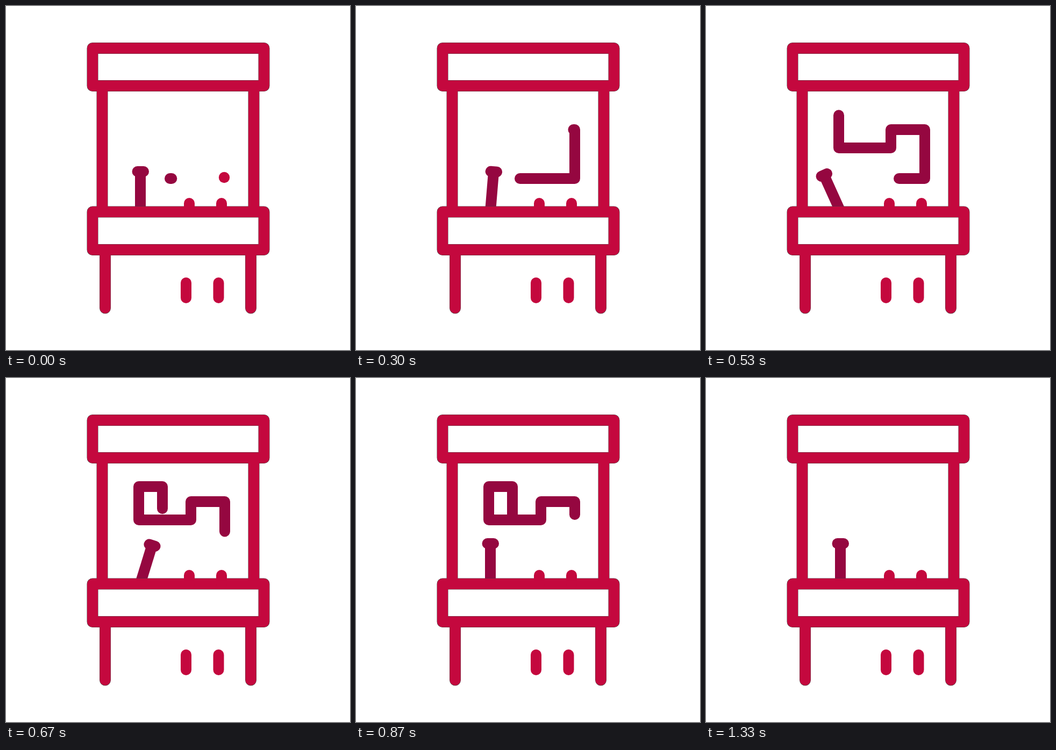
An HTML page that plays this animation: 640x640 px, repeating every 1670 ms.

```html
<!DOCTYPE html>
<html lang="en">
<head>
<meta charset="utf-8">
<title>Arcade machine</title>
<style>
  html, body { margin: 0; width: 100%; height: 100%; overflow: hidden; background: #fff; }
  svg { display: block; width: 100%; height: 100%; }
  .line { fill: none; stroke: #c4083e; stroke-width: 20; stroke-linecap: round; stroke-linejoin: round; }
  .edge { stroke: #444; stroke-width: 21; }
  .dark { stroke: #950740; }
</style>
</head>
<body>
<svg viewBox="0 0 640 640">
  <defs>
    <path id="cabinet" d="M179 148.5V383M461 148.5V383M184.5 453.5V562M455.5 453.5V562
      M161 78.5H480V148.5H161ZM161 383H480V453.5H161Z"/>
  </defs>
  <g id="stick" class="line dark">
    <path d="M250 308V382" stroke-linecap="butt"/>
    <path d="M244.5 308H256"/>
  </g>
  <circle id="food" cx="406" cy="319" r="10.2" fill="#c4083e"/>
  <path id="snake" class="line dark" d="M305 321H407V230H344V264H247V202H291V264"/>
  <use href="#cabinet" class="line edge"/>
  <use href="#cabinet" class="line"/>
  <path class="line" d="M341 367V383M401 367V383M335 515V543M395.5 515V543"/>
</svg>
<script>
const LOOP = 1670, STEP = 33.34;
const [stick, food, snake] = ["stick", "food", "snake"].map(id => document.getElementById(id));

// Cubic bezier easing (.4, 0, .6, 1), solved by bisection
function ease(x) {
  if (x <= 0) return 0;
  if (x >= 1) return 1;
  let lo = 0, hi = 1, s;
  for (let i = 0; i < 24; i++) {
    s = (lo + hi) / 2;
    const r = 1 - s;
    if (1.2 * s * r * r + 1.8 * s * s * r + s ** 3 < x) lo = s; else hi = s;
  }
  return s * s * (3 - 2 * s);
}

const tween = (n, start, end, from, to) => from + (to - from) * ease((n - start) / (end - start));

// Stick angle keys: [step, degrees]
const tilt = [[0, 0], [5, 18], [15.5, -25.2], [20.5, 18], [26, 0]];

function angle(n) {
  const i = tilt.findIndex(key => key[0] > n);
  if (i < 0) return 0;
  const [a, from] = tilt[i - 1], [b, to] = tilt[i];
  return tween(n, a, b, from, to);
}

function draw(now) {
  const n = Math.floor((now % LOOP + 3.4) / STEP);
  const head = tween(n, -0.8, 23.2, 2, 555);
  const tail = tween(n, 11.1, 23.7, 0, 169);
  const blink = n >= 31 && n < 34 || n >= 40;

  snake.setAttribute("stroke-dasharray", `${head - tail} 999`);
  snake.setAttribute("stroke-dashoffset", -tail);
  snake.setAttribute("visibility", blink ? "hidden" : "visible");
  food.setAttribute("visibility", head > 90 ? "hidden" : "visible");
  stick.setAttribute("transform", `rotate(${angle(n)} 250 382)`);
}

const start = performance.now();
function tick() {
  draw(performance.now() - start);
  requestAnimationFrame(tick);
}
tick();
</script>
</body>
</html>
```
